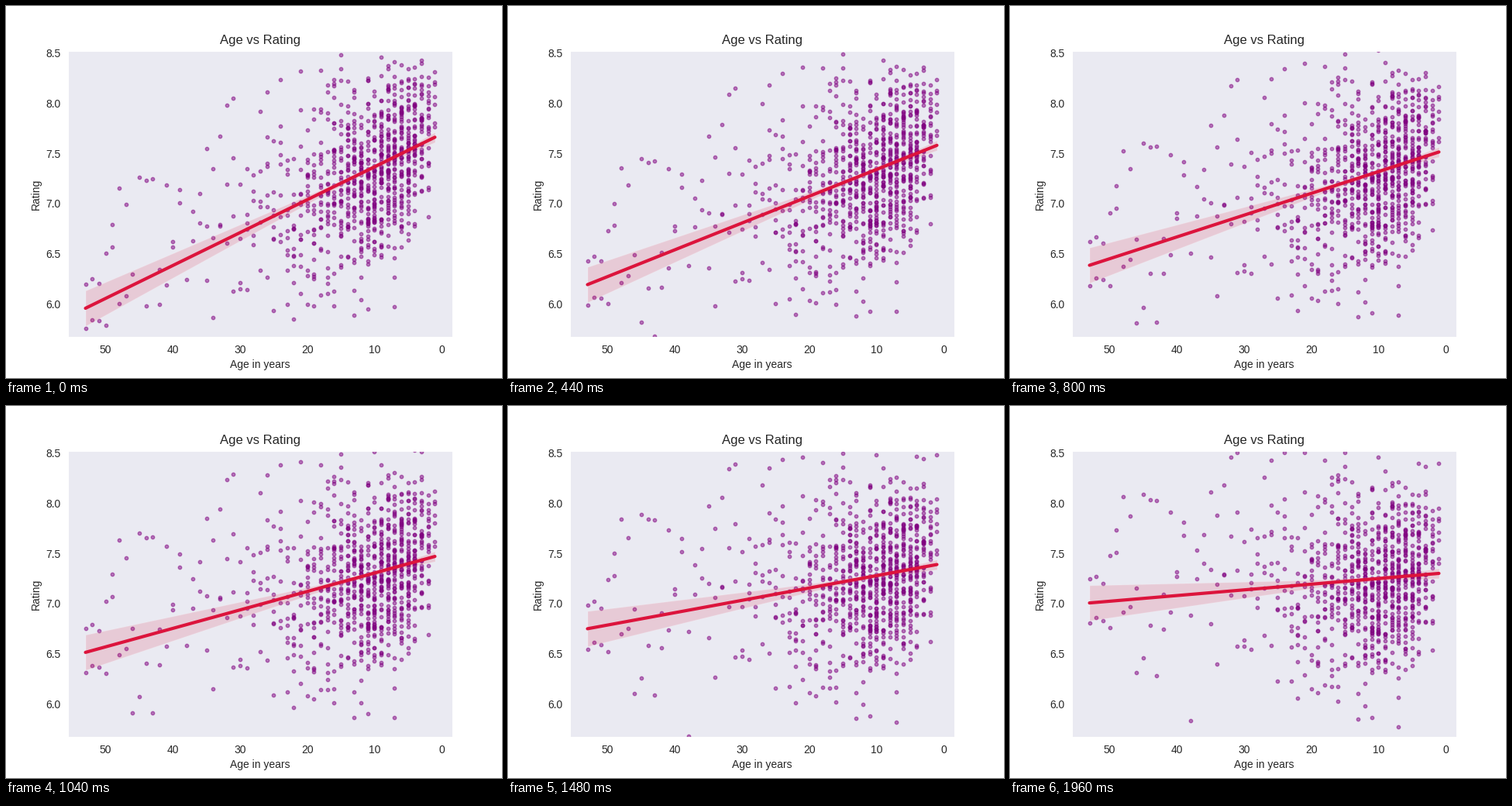
Write a matplotlib script that moves like this. It is 640 px wide and 480 px high and loops after 2000 ms.

```python
import numpy as np
import matplotlib.pyplot as plt
from matplotlib.animation import FuncAnimation

FRAMES, INTERVAL = 50, 40
YOUNGEST, OLDEST = 1, 53
PEAK_AGE, PEAK_COUNT = 7.5, 62

plt.rcParams.update({
    "font.family": "Liberation Sans",
    "text.color": ".15",
    "axes.labelcolor": ".15",
    "xtick.color": ".15",
    "ytick.color": ".15",
    "axes.facecolor": "#EAEAF2",
    "axes.edgecolor": "white",
})


def fit(age, frame):
    """Regression line, tilting steadily towards flat."""
    old = 5.957 + 0.0214 * frame
    young = 7.66 - 0.00735 * frame
    return young + (old - young) * (age - YOUNGEST) / (OLDEST - YOUNGEST)


def build_points(rng):
    """Ages crowd around the peak; ratings scatter more for old films."""
    years = np.arange(YOUNGEST, OLDEST + 1)
    x = years / PEAK_AGE
    counts = np.rint(1.7 + PEAK_COUNT * (x * np.exp(1 - x)) ** 2).astype(int)
    ages = np.repeat(years, counts).astype(float)
    center = 7.22 + 0.9 * np.exp(-ages / 2.5)
    ratings = rng.normal(center, 0.42 + 0.006 * ages)
    return ages, np.clip(ratings, 5.7, 8.5)


ages, final = build_points(np.random.default_rng(7))
grid = np.linspace(YOUNGEST, OLDEST, 100)
half = np.hypot(0.022, 0.0042 * (grid - 11.5))

fig, ax = plt.subplots(figsize=(6.4, 4.8), dpi=100)
ax.set(xlim=(55.6, -1.6), ylim=(5.67, 8.522), title="Age vs Rating",
       xlabel="Age in years", ylabel="Rating")
ax.set_xticks(range(0, 51, 10))
ax.set_yticks(np.arange(6, 8.6, 0.5))
ax.tick_params(left=False, bottom=False)

dots = ax.scatter(ages, final, s=10, color="purple", alpha=0.5, linewidths=1)
band = ax.fill_between(grid, grid, facecolor="crimson", edgecolor="white",
                       alpha=0.15, linewidth=1)
line, = ax.plot(grid, grid, color="crimson", lw=3, solid_capstyle="round")


def update(frame):
    shift = fit(ages, frame) - fit(ages, FRAMES - 1)
    dots.set_offsets(np.column_stack([ages, final + shift]))
    mid = fit(grid, frame)
    line.set_ydata(mid)
    lower = np.column_stack([grid, mid - half])
    upper = np.column_stack([grid, mid + half])
    band.set_verts([np.vstack([lower, upper[::-1]])])
    return dots, band, line


anim = FuncAnimation(fig, update, frames=FRAMES, interval=INTERVAL,
                     repeat=True, repeat_delay=0)
plt.show()
```
